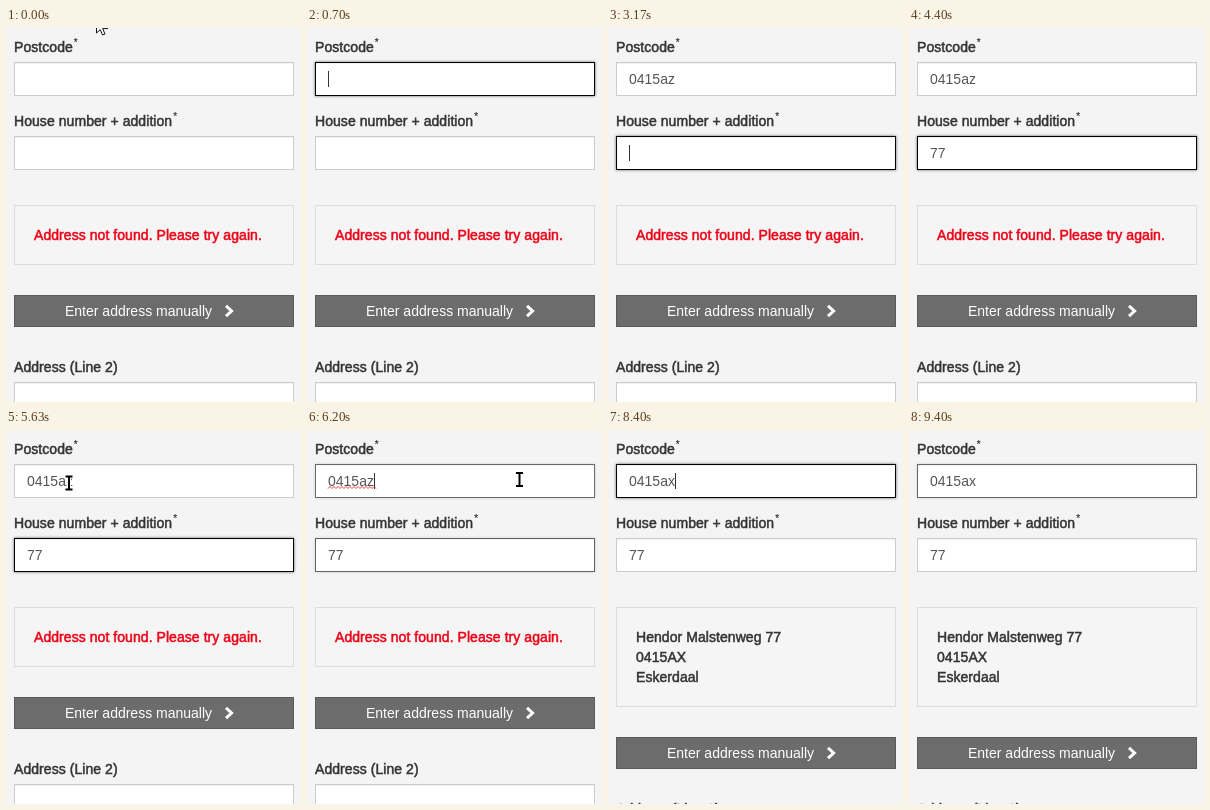
Write an HTML page that moves like this. It is 295 px wide and 374 px high and loops after 9.43 s.

```html
<!DOCTYPE html>
<html lang="en">
<head>
<meta charset="utf-8">
<title>Address form</title>
<style>
  html, body { margin: 0; width: 100%; height: 100%; overflow: hidden; background: #f4f4f4; }
  svg { display: block; width: 100%; height: 100%; }
  text { font: 14px "Liberation Sans", Arial, sans-serif; fill: #555; white-space: pre; }
  .label { fill: #333; stroke: #333; stroke-width: .5px; letter-spacing: .06px; }
  .error { fill: #ee0016; stroke: #ee0016; }
  .star { font-size: 10px; stroke-width: .2px; }
  .caret { fill: #333; }
  .panel { fill: #f5f5f5; stroke: #ddd; }
</style>
</head>
<body>
<svg id="stage" viewBox="0 0 295 374">
  <defs>
    <filter id="blur" x="-10%" y="-50%" width="120%" height="200%">
      <feGaussianBlur stdDeviation="1.8"/>
    </filter>
  </defs>
  <rect width="295" height="374" fill="#f4f4f4"/>
  <text class="label" x="8" y="24">Postcode<tspan class="star" dx="1" dy="-6">*</tspan></text>
  <text class="label" x="8" y="98">House number + addition<tspan class="star" dx="1" dy="-6">*</tspan></text>
  <g id="fields"></g>
  <rect id="panel" class="panel" x="8.5" y="177.5" width="279" height="59"/>
  <text id="error" class="label error" x="28" y="212">Address not found. Please try again.</text>
  <g id="found" class="label">
    <text class="label" x="28" y="212">Hendor Malstenweg 77</text>
    <text class="label" x="28" y="232">0415AX</text>
    <text class="label" x="28" y="252">Eskerdaal</text>
  </g>
  <g id="lower">
    <rect x="8.5" y="267.5" width="279" height="31" fill="#6c6c6c" stroke="#5a5a5a"/>
    <text x="59" y="288" style="fill:#fff">Enter address manually</text>
    <path d="M220 277.8L225.6 283L220 288.2" fill="none" stroke="#fff" stroke-width="3"/>
    <text class="label" x="8" y="344">Address (Line 2)</text>
    <rect x="8.5" y="354.5" width="279" height="33" fill="#fff" stroke="#ccc"/>
    <path d="M9 355.5H287" stroke="#000" stroke-opacity=".05"/>
  </g>
  <path id="arrow" d="M.5 .5V16L4.2 12.6L6.6 18L9 17L6.6 11.6H11.8Z" fill="#fff" stroke="#111"/>
  <g id="beam" fill="none">
    <path d="M-4 -6.5H4M-4 6.5H4M0 -6.5V6.5" stroke="#fff" stroke-width="4"/>
    <path d="M-3.5 -6.5H3.5M-3.5 6.5H3.5M0 -6.5V6.5" stroke="#000" stroke-width="2"/>
  </g>
</svg>
<script>
const LOOP = 9430, FADE = 150;
const NS = "http://www.w3.org/2000/svg";
const $ = id => document.getElementById(id);

function add(parent, tag, attrs) {
  const el = document.createElementNS(NS, tag);
  for (const k in attrs) el.setAttribute(k, attrs[k]);
  return parent.appendChild(el);
}

function makeField(y) {
  const g = add($("fields"), "g", { transform: `translate(0 ${y})` });
  const glow = add(g, "rect", { x: 8, width: 280, height: 34, filter: "url(#blur)" });
  const box = add(g, "rect", { x: 8.5, y: .5, width: 279, height: 33, fill: "#fff" });
  add(g, "path", { d: "M9 1.5H287", stroke: "#000", "stroke-opacity": .05 });
  const text = add(g, "text", { x: 21, y: 22 });
  const caret = add(g, "rect", { class: "caret", y: 9, width: 1, height: 16 });
  return { g, glow, box, text, caret };
}

const postcode = makeField(34), house = makeField(108);

let wave = "M21 24.5";
for (let x = 21; x < 66; x += 4) wave += "l2 -2l2 2";
const squiggle = add(postcode.g, "path", { d: wave, fill: "none", stroke: "#e33", "stroke-width": .9 });

const postcodeText = [[0, ""], [1670, "04"], [2070, "041"], [2400, "0415"], [2730, "0415az"],
  [6730, "0415a"], [7000, "0415ax"]];
const houseText = [[0, ""], [3770, "7"], [3800, "77"]];
const postcodeCaret = [[533, 1400], [1670, 3030], [6130, 7700], [8400, 8900]];
const houseCaret = [[3030, 3630], [3770, 4400], [5000, 5600]];

// Pointer paths: time, x, y
const paths = [
  [[0, 90, -11], [100, 273, 35], [300, 273, 35], [467, 255, 51], [533, 255, 51], [700, 305, 60]],
  [[5430, 96, 136], [5633, 63, 53], [5700, 66, 52], [6000, 212.5, 49.5], [6265, 212.5, 49.5]]
];

const ease = u => u * u * (3 - 2 * u);
const ramp = (t, start) => ease(Math.min(1, Math.max(0, (t - start) / FADE)));
const within = (t, spans) => spans.some(([a, b]) => t >= a && t < b);
const latest = (t, steps) => steps.filter(s => t >= s[0]).pop()[1];
const show = (el, on) => el.setAttribute("visibility", on ? "visible" : "hidden");

function pointer(t) {
  for (const path of paths)
    for (let i = 1; i < path.length; i++) {
      const [a, ax, ay] = path[i - 1], [b, bx, by] = path[i];
      if (t >= a && t < b) {
        const u = ease((t - a) / (b - a));
        return [ax + (bx - ax) * u, ay + (by - ay) * u];
      }
    }
  return null;
}

function drawField(f, value, focus, caretOn) {
  const c = Math.round(204 * (1 - focus));
  f.box.setAttribute("stroke", `rgb(${c},${c},${c})`);
  f.glow.setAttribute("opacity", .6 * focus * focus);
  if (f.text.textContent !== value) f.text.textContent = value;
  const w = value ? f.text.getComputedTextLength() : 0;
  f.caret.setAttribute("x", Math.round(21 + w));
  show(f.caret, caretOn);
}

function draw(ms) {
  const t = Math.floor((ms + 4) * .03) / .03; // 30 pictures a second
  const toHouse = ramp(t, 3017), back = ramp(t, 6127);
  drawField(postcode, latest(ms, postcodeText),
    ramp(t, 533) - toHouse + back - ramp(t, 9325), within(ms, postcodeCaret));
  drawField(house, latest(ms, houseText), toHouse - back, within(ms, houseCaret));
  show(squiggle, within(ms, [[6130, 6730]]));

  const found = ms >= 7130;
  show($("found"), found);
  show($("error"), !found);
  $("panel").setAttribute("height", found ? 99 : 59);
  $("lower").setAttribute("transform", `translate(0 ${found ? 40 : 0})`);

  const p = pointer(t);
  const inField = p && t > 90;
  show($("arrow"), p && !inField);
  show($("beam"), inField);
  if (p) $(inField ? "beam" : "arrow").setAttribute("transform", `translate(${p[0]} ${p[1]})`);
}

const start = performance.now();
function tick() {
  draw((performance.now() - start) % LOOP);
  requestAnimationFrame(tick);
}
tick();
</script>
</body>
</html>
```
